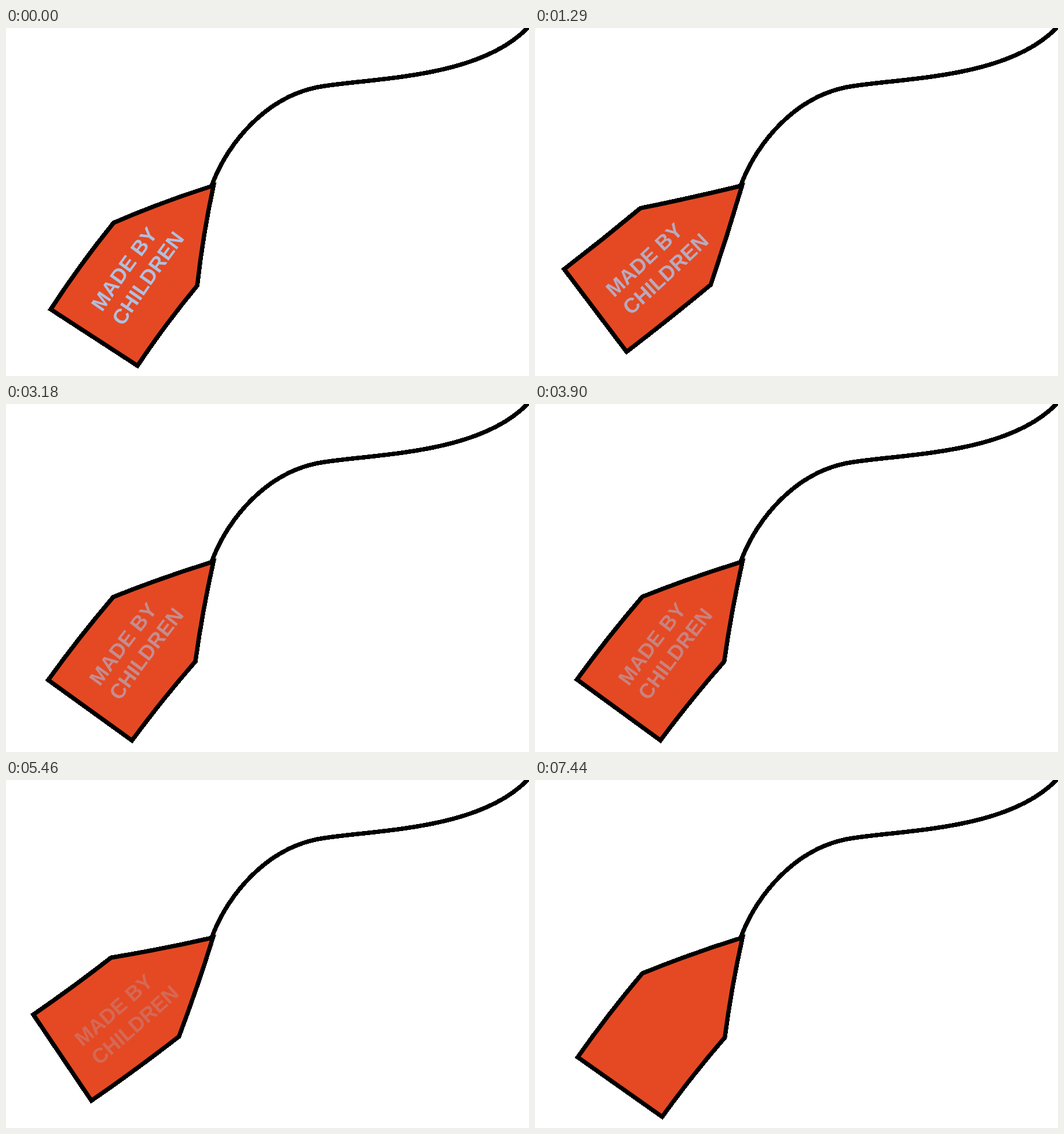
An HTML page for the animation above (7470 ms loop, 903 by 600 pixels).

```html
<!DOCTYPE html>
<html lang="en">
<head>
<meta charset="utf-8">
<title>Swinging tag</title>
<style>
  html, body { margin: 0; width: 100%; height: 100%; overflow: hidden; background: #fff; }
  svg { display: block; width: 100%; height: 100%; }
  text { font: bold 36px "Liberation Sans", Arial, sans-serif; fill: #b0bfde; }
  .crisp { shape-rendering: crispEdges; }
</style>
</head>
<body>
<svg viewBox="0 0 903 600">
  <defs>
    <path id="tag"/>
    <path id="line1"/>
    <path id="line2"/>
  </defs>
  <!-- hard outer edge, smooth inner edge -->
  <g stroke="#000" stroke-miterlimit="10">
    <use href="#tag" class="crisp" stroke-width="8"/>
    <use href="#tag" fill="#e44923" stroke-width="7"/>
  </g>
  <g id="label">
    <text><textPath href="#line1">MADE BY</textPath></text>
    <text><textPath href="#line2">CHILDREN</textPath></text>
  </g>
  <path class="crisp" d="M355.5 271C383 196 453 114.5 547 100.5C640 85.5 823 86.5 905 -5" fill="none" stroke="#000" stroke-width="7.5"/>
</svg>
<script>
const LOOP = 7470, STEP = 30, FADE = 7440;
const STRAIGHT = 47.5; // angle at which the tag is not bent
const SIDE_BEND = 0.8, TEXT_BEND = 0.5;

// Angle of the tag's lower edge, in degrees: [ms, angle]
const SWING = [
  [0, 32.9], [750, 44.8], [1290, 52.9], [1640, 56.5], [2280, 48.2],
  [3180, 35.7], [3540, 32.2], [3750, 33.9], [4500, 47.05], [5250, 56.7],
  [5460, 55.95], [6000, 47.7], [6750, 36.4], [7140, 32.2], [7440, 35.1]
];

// Each point at the three reference angles
const ANGLES = [32.9, 47.05, 55.95];
const POINTS = {
  apex:          [[358, 272], [357.5, 272], [357, 272]],
  leftShoulder:  [[186, 336], [183, 319], [181.5, 306.5]],
  leftFoot:      [[77.5, 485], [57.5, 437], [47.5, 404.5]],
  rightFoot:     [[227, 582], [178.5, 567], [147.5, 552.5]],
  rightShoulder: [[330, 444], [312, 443], [298.5, 442]],
  line1Start:    [[166, 490.5], [145.5, 474], [131.7, 460.5]],
  line1End:      [[263, 356], [259.5, 353.5], [256.2, 351]],
  line2Start:    [[202, 515], [175.5, 502.5], [160.5, 492.7]],
  line2End:      [[307.5, 365], [304, 368.5], [300.7, 370.3]]
};

const el = id => document.getElementById(id);
const slope = i => (SWING[i + 1][1] - SWING[i][1]) / (SWING[i + 1][0] - SWING[i][0]);

// Monotone tangents: flat at the turning points
const tangents = SWING.map((_, i) => {
  if (i === 0) return slope(0);
  if (i === SWING.length - 1) return slope(i - 1);
  const a = slope(i - 1), b = slope(i);
  return a * b <= 0 ? 0 : 2 * a * b / (a + b);
});

function swingAngle(t) {
  let i = 0;
  while (i < SWING.length - 2 && t > SWING[i + 1][0]) i++;
  const [t0, a] = SWING[i], [t1, b] = SWING[i + 1];
  const h = t1 - t0, u = (t - t0) / h, v = 1 - u;
  return v * v * (1 + 2 * u) * a + u * u * (3 - 2 * u) * b
    + h * u * v * (v * tangents[i] - u * tangents[i + 1]);
}

function poseAt(angle) {
  const weights = ANGLES.map(a => ANGLES.reduce(
    (w, b) => b === a ? w : w * (angle - b) / (a - b), 1));
  const pose = {};
  for (const [name, refs] of Object.entries(POINTS)) {
    pose[name] = [0, 1].map(axis =>
      refs.reduce((sum, p, i) => sum + weights[i] * p[axis], 0));
  }
  return pose;
}

// Curve from p to q whose middle is pushed sideways by the bend
function bowed(p, q, bend) {
  const x = (p[0] + q[0]) / 2 - (q[1] - p[1]) * bend / 4;
  const y = (p[1] + q[1]) / 2 + (q[0] - p[0]) * bend / 4;
  return `Q${x} ${y} ${q[0]} ${q[1]}`;
}

function render(t) {
  const angle = swingAngle(t);
  const bend = (STRAIGHT - angle) * Math.PI / 360;
  const side = bend * SIDE_BEND;
  const p = poseAt(angle);
  el("tag").setAttribute("d", `M${p.apex}`
    + bowed(p.apex, p.leftShoulder, side)
    + bowed(p.leftShoulder, p.leftFoot, side)
    + `L${p.rightFoot}`
    + bowed(p.rightFoot, p.rightShoulder, -side)
    + bowed(p.rightShoulder, p.apex, -side) + "Z");
  for (const id of ["line1", "line2"]) {
    const start = p[id + "Start"];
    el(id).setAttribute("d", `M${start}` + bowed(start, p[id + "End"], -bend * TEXT_BEND));
  }
  el("label").setAttribute("opacity", Math.max(0, 1 - t / FADE));
}

let begin;
function tick(now) {
  begin ??= now;
  const t = (now - begin) % LOOP;
  render(Math.floor(t / STEP) * STEP);
  requestAnimationFrame(tick);
}
render(0);
requestAnimationFrame(tick);
</script>
</body>
</html>
```
